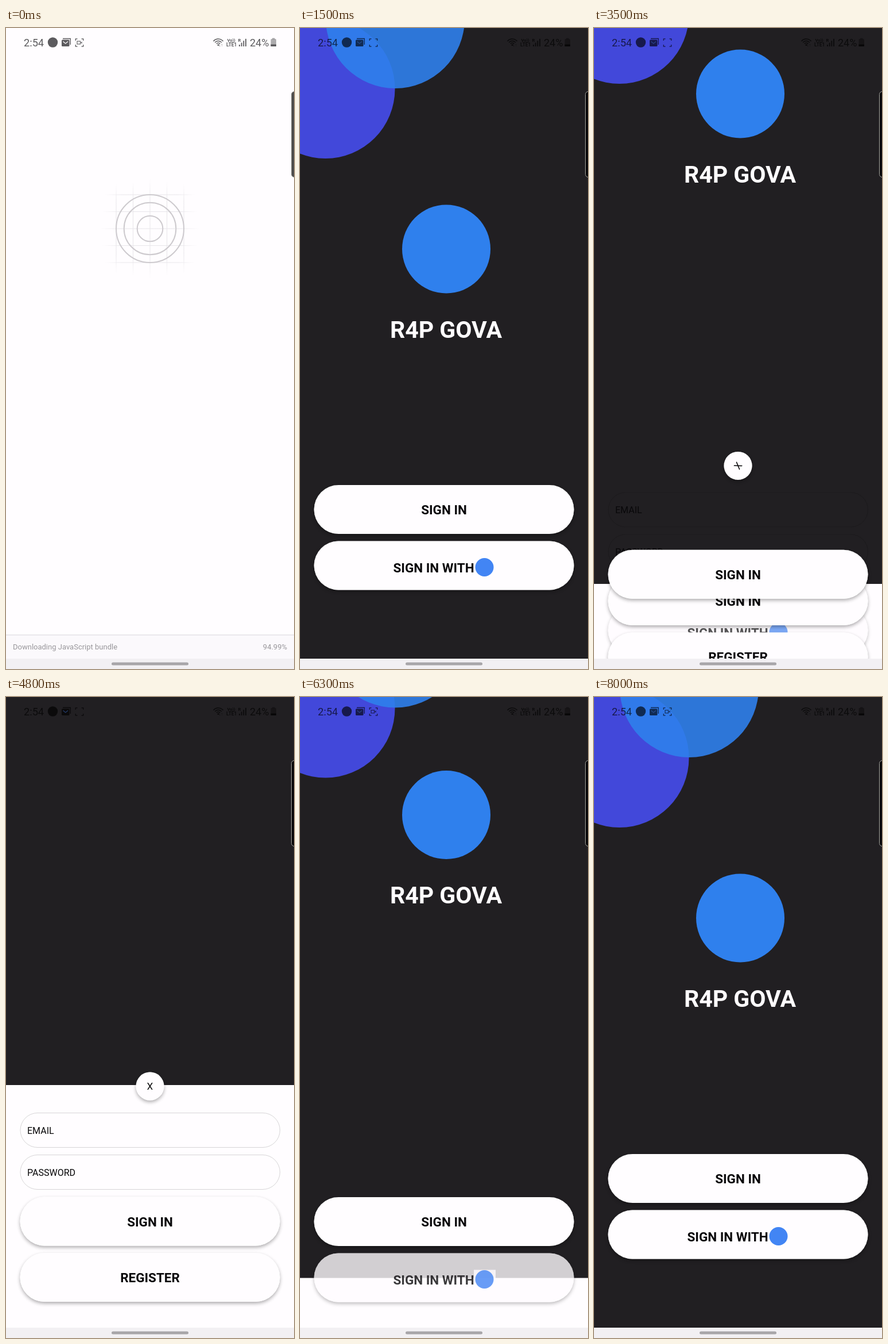
Write an HTML page with a canvas that moves like this. It is 502 by 1115 pixels and loops after 8100 ms.

```html
<!DOCTYPE html>
<html lang="en">
<head>
<meta charset="utf-8">
<title>Sign in flow</title>
<style>
html, body { margin: 0; width: 100%; height: 100%; overflow: hidden; background: #fffdff; }
canvas { display: block; width: 502px; height: 1115px; }
</style>
</head>
<body>
<canvas id="stage" width="502" height="1115"></canvas>
<script>
const ctx = document.getElementById('stage').getContext('2d');
const W = 502, H = 1115, NAV_Y = 1097, CX = 251;
const LOOP = 8100, WELCOME_AT = 1400, OPEN_AT = 3187, CLOSE_AT = 5757, MOVE = 800;
const WHITE = '#fffdff', DARK = '#211f22', BLUE = '#2f80ed', INK = '#09080a';

const clamp = x => Math.min(1, Math.max(0, x));
const easeInOut = x => x < 0.5 ? 2 * x * x : 1 - 2 * (1 - x) ** 2;
const ramp = (t, start, duration) => easeInOut(clamp((t - start) / duration));

function circle(x, y, r, color) {
  ctx.beginPath();
  ctx.arc(x, y, r, 0, 2 * Math.PI);
  ctx.fillStyle = color;
  ctx.fill();
}

function ring(x, y, r, from = 0, to = 2 * Math.PI) {
  ctx.beginPath();
  ctx.arc(x, y, r, from, to);
  ctx.stroke();
}

function pill(x, y, w, h, r = h / 2) {
  const path = new Path2D();
  path.roundRect(x, y, w, h, r);
  return path;
}

function text(str, x, y, font, color, align = 'left') {
  ctx.font = `${font} Roboto, sans-serif`;
  ctx.fillStyle = color;
  ctx.textAlign = align;
  ctx.fillText(str, x, y);
}

function withAlpha(alpha, draw) {
  ctx.save();
  ctx.globalAlpha = alpha;
  draw();
  ctx.restore();
}

// The shadow stays outside the shape, so a translucent shape is not darkened.
function raised(path) {
  const outside = new Path2D();
  outside.rect(-W, -H, 3 * W, 3 * H);
  outside.addPath(path);
  ctx.fillStyle = WHITE;
  ctx.save();
  ctx.clip(outside, 'evenodd');
  ctx.shadowColor = 'rgba(0,0,0,0.32)';
  ctx.shadowBlur = 6;
  ctx.shadowOffsetY = 3;
  ctx.fill(path);
  ctx.restore();
  ctx.fill(path);
}

function button(label, y, x = CX, align = 'center', baseline = 51) {
  raised(pill(24.5, y, 453, 85));
  text(label, x, y + baseline, '700 22.5px', INK, align);
}

function input(label, y) {
  ctx.strokeStyle = 'rgba(0,0,0,0.16)';
  ctx.lineWidth = 1;
  ctx.stroke(pill(25, y + 0.5, 452.5, 60));
  text(label, 37, y + 36.5, '400 16px', INK);
}

function gridLine(x1, y1, x2, y2) {
  const fade = ctx.createLinearGradient(x1, y1, x2, y2);
  fade.addColorStop(0, 'rgba(232,230,234,0)');
  fade.addColorStop(0.2, 'rgba(232,230,234,1)');
  fade.addColorStop(0.8, 'rgba(232,230,234,1)');
  fade.addColorStop(1, 'rgba(232,230,234,0)');
  ctx.strokeStyle = fade;
  ctx.beginPath();
  ctx.moveTo(x1, y1);
  ctx.lineTo(x2, y2);
  ctx.stroke();
}

function drawSplash(t) {
  ctx.fillStyle = WHITE;
  ctx.fillRect(0, 0, W, H);
  const cy = 349;
  ctx.lineWidth = 1;
  for (let i = -2; i <= 2; i++) {
    const d = i * 29.5, reach = 87 - 4 * Math.abs(i);
    gridLine(CX + d, cy - reach, CX + d, cy + reach);
    gridLine(CX - reach, cy + d, CX + reach, cy + d);
  }
  ctx.strokeStyle = '#cdcace';
  ctx.lineWidth = 2;
  for (const r of [59, 45.3, 22.3]) ring(CX, cy, r);

  const y = 1055 + 43 * ramp(t, 150, 350);
  if (y >= NAV_Y) return;
  ctx.fillStyle = '#fbf9fc';
  ctx.fillRect(0, y, W, 43);
  ctx.fillStyle = '#e5e3e7';
  ctx.fillRect(0, y, W, 1.5);
  text('Downloading JavaScript bundle', 12, y + 26, '400 13px', '#99979b');
  text(t < 100 ? '94.99%' : '100.00%', 490, y + 26, '400 13px', '#99979b', 'right');
}

function drawBackdrop(rise) {
  ctx.fillStyle = DARK;
  ctx.fillRect(0, 0, W, H);
  circle(44.5, 106 - rise, 121, '#4248da');
  withAlpha(0.9, () => circle(166, -16 - rise, 121, BLUE));
  ctx.fillStyle = WHITE;
  ctx.fillRect(0, NAV_Y - rise, W, H);
}

function drawBrand(rise) {
  circle(255, 384.5 - rise, 77, BLUE);
  text('R4P GOVA', 254.5, 538.5 - rise, '700 41px', WHITE, 'center');
}

function drawProviderButton(drop, alpha) {
  withAlpha(alpha, () => {
    const y = 892.5 + drop;
    button('SIGN IN WITH', y, 162.5, 'left', 54.5);
    ctx.fillStyle = WHITE;
    ctx.fillRect(303, y + 29, 38, 33);
    circle(321.5, y + 45.5, 16, '#4285f4');
  });
}

function drawForm(drop, turn, alpha) {
  withAlpha(alpha, () => {
    ctx.translate(0, drop);
    input('EMAIL', 723);
    input('PASSWORD', 796);
    button('SIGN IN', 869.5);
    button('REGISTER', 967);
    raised(pill(CX - 24.5, 652.5, 49, 49));
    ctx.translate(CX, 677);
    ctx.rotate(turn);
    text('X', 0, 6, '400 17px', INK, 'center');
  });
}

function drawApp(t) {
  const p = ramp(t, OPEN_AT, MOVE) - ramp(t, CLOSE_AT, MOVE);
  const formAlpha = ramp(t, OPEN_AT, 250) - ramp(t, CLOSE_AT, 550);
  drawBackdrop(422 * p);
  drawBrand(876 * p);
  if (p < 1) drawProviderButton(366 * p, 1 - p);
  if (formAlpha > 0) drawForm(122 * (1 - p), -Math.PI * p, formAlpha);
  button('SIGN IN', 795 + 366 * p);
}

function drawStatus(t) {
  const ink = t < WELCOME_AT ? '#5c5b5e' : 'rgba(0,0,0,0.65)';
  const recording = t < 1000 || t >= CLOSE_AT;
  text('2:54', 31, 32, '400 18.2px', ink);
  text('24%', 425, 32, '400 18px', ink);
  circle(81.5, 25, 8.7, ink);

  // Mail
  ctx.strokeStyle = ctx.fillStyle = ink;
  ctx.lineWidth = 1.3;
  ctx.beginPath();
  ctx.moveTo(99, 18.5);
  ctx.lineTo(112.3, 18.5);
  ctx.lineTo(112.3, 29);
  ctx.stroke();
  ctx.fill(pill(97, 20.5, 13.5, 11.5, 1.5));
  ctx.strokeStyle = t < WELCOME_AT ? WHITE : 'rgba(60,110,200,0.5)';
  ctx.beginPath();
  ctx.moveTo(99.5, 23.5);
  ctx.lineTo(103.7, 27);
  ctx.lineTo(108, 23.5);
  ctx.stroke();

  // Screen capture
  ctx.strokeStyle = ink;
  for (const sx of [-1, 1]) for (const sy of [-1, 1]) {
    ctx.beginPath();
    ctx.moveTo(128 + 3.5 * sx, 25.5 + 6.7 * sy);
    ctx.lineTo(128 + 6.7 * sx, 25.5 + 6.7 * sy);
    ctx.lineTo(128 + 6.7 * sx, 25.5 + 3.5 * sy);
    ctx.stroke();
  }
  if (recording) {
    ctx.lineWidth = 1.1;
    ctx.strokeRect(124, 23, 5.5, 5);
    ctx.beginPath();
    ctx.moveTo(130, 25.5);
    ctx.lineTo(132.5, 23.5);
    ctx.lineTo(132.5, 27.5);
    ctx.fill();
  }

  // Wi-Fi and signal
  ctx.lineWidth = 1.5;
  for (const r of [4, 7.5, 11]) ring(370, 30, r, -Math.PI * 0.78, -Math.PI * 0.22);
  circle(370, 29.5, 1.5, ink);
  text('↓↑', 371, 32, '700 7px', ink);
  text('Vo))', 385.5, 23.5, '700 7.5px', ink);
  text('LTE1', 384, 32, '700 8.3px', ink);
  text('R', 404.5, 23.5, '700 7.5px', ink);
  for (let i = 0; i < 4; i++) {
    const h = 3 + 3.4 * i;
    ctx.fillRect(406 + i * 3.7, 32 - h, 1.8, h);
  }

  // Battery
  withAlpha(0.5, () => {
    ctx.fillRect(464, 17.5, 4.5, 2);
    ctx.fill(pill(461.5, 19, 9.5, 13, 1.5));
  });
  ctx.fillRect(461.5, 28.5, 9.5, 3.5);
}

function drawSystem(t) {
  drawStatus(t);
  const edgePanel = pill(497.5, 110.5, 12, 149, 5);
  ctx.fillStyle = t < WELCOME_AT ? '#4d4c4b' : '#09080a';
  ctx.fill(edgePanel);
  ctx.strokeStyle = '#a5a59f';
  ctx.lineWidth = 1;
  ctx.stroke(edgePanel);
  ctx.fillStyle = '#f2f0f3';
  ctx.fillRect(0, NAV_Y, W, H - NAV_Y);
  ctx.fillStyle = '#a8a6a9';
  ctx.fill(pill(184, 1103.5, 134, 5));
}

const start = performance.now();
function frame() {
  const t = (performance.now() - start) % LOOP;
  ctx.clearRect(0, 0, W, H);
  (t < WELCOME_AT ? drawSplash : drawApp)(t);
  drawSystem(t);
  requestAnimationFrame(frame);
}
frame();
</script>
</body>
</html>
```
